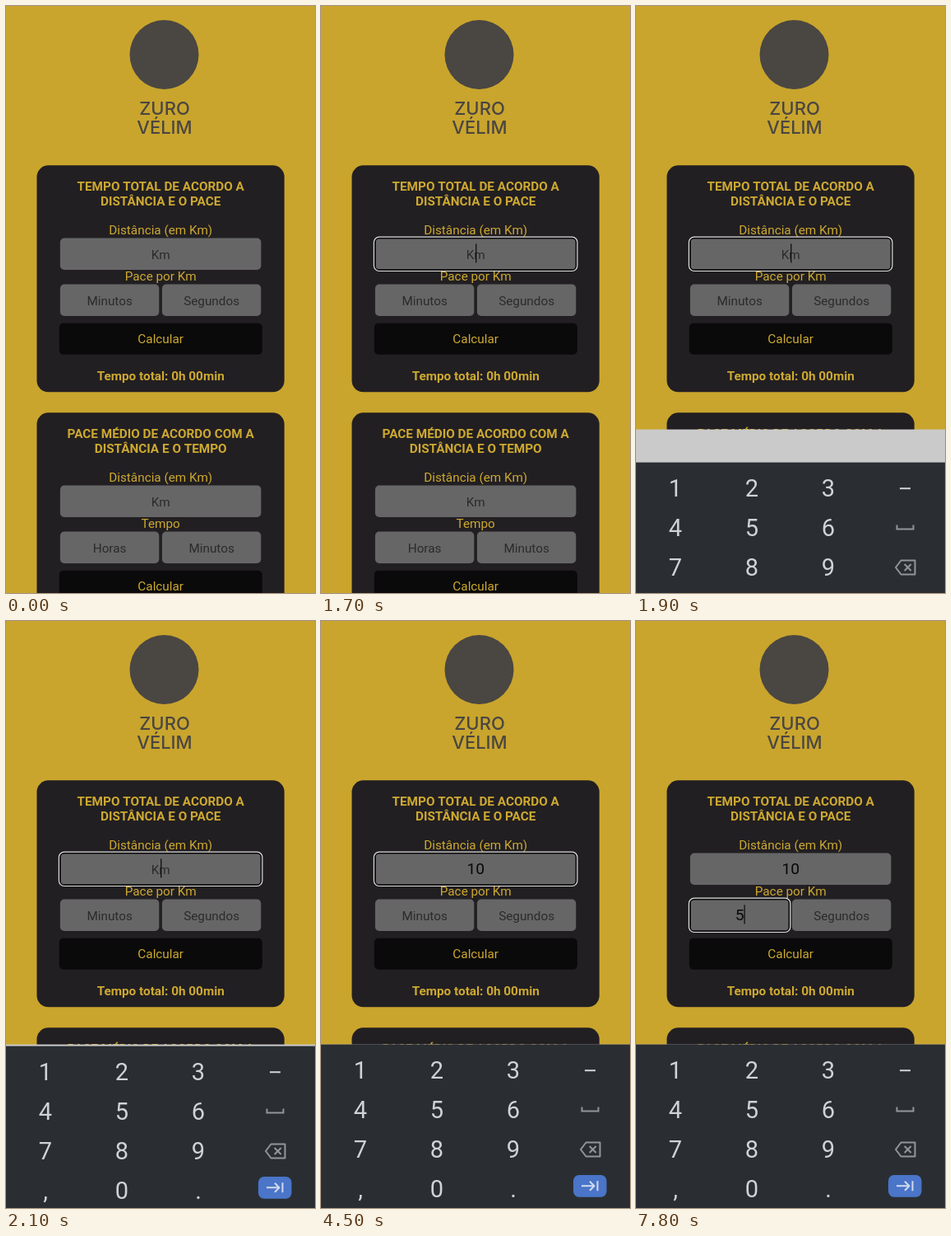
Animation of 376x712 px, one loop 8 s. Source, as an HTML page with a canvas:

```html
<!DOCTYPE html>
<html lang="pt-BR">
<head>
<meta charset="utf-8">
<title>Calculadora de pace</title>
<style>
  html, body { margin: 0; width: 100%; height: 100%; overflow: hidden; background: #c9a52d; }
  canvas { display: block; width: 376px; height: 712px; }
</style>
</head>
<body>
<canvas id="stage"></canvas>
<script>
const W = 376, H = 712, LOOP = 8000, TICK = 100;
const GOLD = '#c9a52d', TEXT = '#cda931', CARD = '#221f22', FIELD = '#666667',
      HINT = '#2c2b2c', BUTTON = '#0a0a0a', KEYS = '#2a2e33', DIGIT = '#d0d3d6', DIM = '#92969b';
const SANS = 'Roboto, sans-serif';
const MID = 188.2, FIELD_H = 38.4, KEYS_TOP = 513.6;

const canvas = document.getElementById('stage');
const ctx = canvas.getContext('2d');
const dpr = window.devicePixelRatio || 1;
canvas.width = W * dpr;
canvas.height = H * dpr;
ctx.scale(dpr, dpr);

// Each entry restarts the caret blink.
const edits = [
  { at: 1600, field: 'km' },
  { at: 3500, field: 'km', km: '1', key: '1' },
  { at: 3900, field: 'km', km: '10', key: '0' },
  { at: 4800, field: 'min', km: '10' },
  { at: 6700, field: 'min', km: '10', min: '5' }
];

const fields = {
  km: { x: 65.9, y: 281.6, w: 244.5 },
  min: { x: 65.9, y: 337.6, w: 120.4 },
  sec: { x: 189.9, y: 337.6, w: 120.4 }
};

function box(x, y, w, h, r, fill) {
  ctx.beginPath();
  ctx.roundRect(x, y, w, h, r);
  ctx.fillStyle = fill;
  ctx.fill();
}

function ring({ x, y, w }, grow, r, color, width) {
  ctx.beginPath();
  ctx.roundRect(x - grow, y - grow, w + 2 * grow, FIELD_H + 2 * grow, r);
  ctx.strokeStyle = color;
  ctx.lineWidth = width;
  ctx.stroke();
}

function line(points, color, width) {
  ctx.beginPath();
  points.forEach(([x, y]) => ctx.lineTo(x, y));
  ctx.strokeStyle = color;
  ctx.lineWidth = width;
  ctx.stroke();
}

function label(str, x, y, color = TEXT, size = 15.31, weight = 400, family = SANS) {
  ctx.font = `${weight} ${size}px ${family}`;
  ctx.fillStyle = color;
  ctx.textAlign = 'center';
  ctx.fillText(str, x, y);
}

function drawField({ x, y, w }, hint, value) {
  box(x, y, w, FIELD_H, 5, FIELD);
  const cx = x + w / 2;
  if (value) label(value, cx, y + 25.1, '#080808', 19.14);
  else label(hint, cx, y + 25.1, HINT);
}

function drawFocus(field, value, caretOn) {
  ring(field, 0.2, 5, '#0c0c0d', 2);
  ring(field, 1.5, 6.5, '#e0e0e0', 1.2);
  if (!caretOn) return;
  ctx.font = `19.14px ${SANS}`;
  const half = value ? ctx.measureText(value).width / 2 : 0;
  ctx.fillStyle = '#080808';
  ctx.fillRect(field.x + field.w / 2 + half, field.y + 6.8, 1.2, 23);
}

function drawBrand() {
  const ink = '#4a4642';
  ctx.beginPath();
  ctx.arc(192.5, 59, 42, 0, Math.PI * 2);
  ctx.fillStyle = ink;
  ctx.fill();
  label('ZURO', 193, 132, ink, 22, 500, 'Inter, sans-serif');
  label('VÉLIM', 193, 155, ink, 22, 500, 'Inter, sans-serif');
}

function drawCard(top, title, unit, left, right, values) {
  box(37.5, top + 0.3, 301.2, 275, 14, CARD);
  title.forEach((str, i) => label(str, MID, top + 30.7 + i * 18, TEXT, 15.31, 700));
  label('Distância (em Km)', MID, top + 84.4);
  label(unit, MID, top + 140.4);
  ctx.save();
  ctx.translate(0, top - 193);
  drawField(fields.km, 'Km', values.km);
  drawField(fields.min, left, values.min);
  drawField(fields.sec, right);
  ctx.restore();
  box(64.8, top + 191.8, 247, 38, 5, BUTTON);
  label('Calcular', MID, top + 216.1);
}

function drawKeyboard(drop, pressed) {
  ctx.fillStyle = '#cacaca';
  ctx.fillRect(0, KEYS_TOP, W, H - KEYS_TOP);
  ctx.save();
  ctx.translate(0, drop);
  ctx.fillStyle = KEYS;
  ctx.fillRect(0, KEYS_TOP, W, H - KEYS_TOP);

  ['123', '456', '789', ',0.'].forEach((row, r) =>
    [...row].forEach((key, c) =>
      label(key, 48 + c * 93, 554.8 + r * 48, key === pressed ? '#ffffff' : DIGIT, 29)));

  line([[321, 545.2], [334, 545.2]], DIGIT, 2);
  line([[317.5, 589.5], [317.5, 594.5], [337.5, 594.5], [337.5, 589.5]], DIM, 2);

  ctx.lineJoin = 'round';
  line([[316, 641], [322.5, 632.5], [339.5, 632.5], [339.5, 649.5], [322.5, 649.5], [316, 641], [322.5, 632.5]], DIM, 2);
  line([[326.7, 637], [334.7, 645]], DIM, 2);
  line([[334.7, 637], [326.7, 645]], DIM, 2);

  box(307, 672, 40.5, 26.7, 7, '#4a75c8');
  const arrow = '#d0daee';
  line([[317, 685.2], [332, 685.2]], arrow, 2);
  line([[327, 679.7], [332.5, 685.2], [327, 690.7]], arrow, 2);
  line([[336.5, 679.2], [336.5, 691.2]], arrow, 2);
  ctx.restore();
}

function draw(t) {
  const edit = edits.filter(e => e.at <= t).pop();
  const now = edit || {};
  const age = edit ? t - edit.at : 0;

  ctx.fillStyle = GOLD;
  ctx.fillRect(0, 0, W, H);
  drawBrand();
  drawCard(193, ['TEMPO TOTAL DE ACORDO A', 'DISTÂNCIA E O PACE'],
    'Pace por Km', 'Minutos', 'Segundos', now);
  label('Tempo total: 0h 00min', MID, 454.1, TEXT, 15.31, 700);
  drawCard(493, ['PACE MÉDIO DE ACORDO COM A', 'DISTÂNCIA E O TEMPO'],
    'Tempo', 'Horas', 'Minutos', {});

  if (edit) {
    const caretOn = age < 600 || Math.floor((age - 600) / 500) % 2 === 1;
    drawFocus(fields[edit.field], edit[edit.field], caretOn);
  }
  if (t >= 1800) {
    const drop = 198 * Math.pow(0.2, (t - 1800) / 100);
    drawKeyboard(drop < 0.5 ? 0 : Math.round(drop), age < 100 ? now.key : '');
  }
}

const start = performance.now();
function frame() {
  const t = (performance.now() - start) % LOOP;
  draw(Math.floor(t / TICK) * TICK);
  requestAnimationFrame(frame);
}
frame();
</script>
</body>
</html>
```
